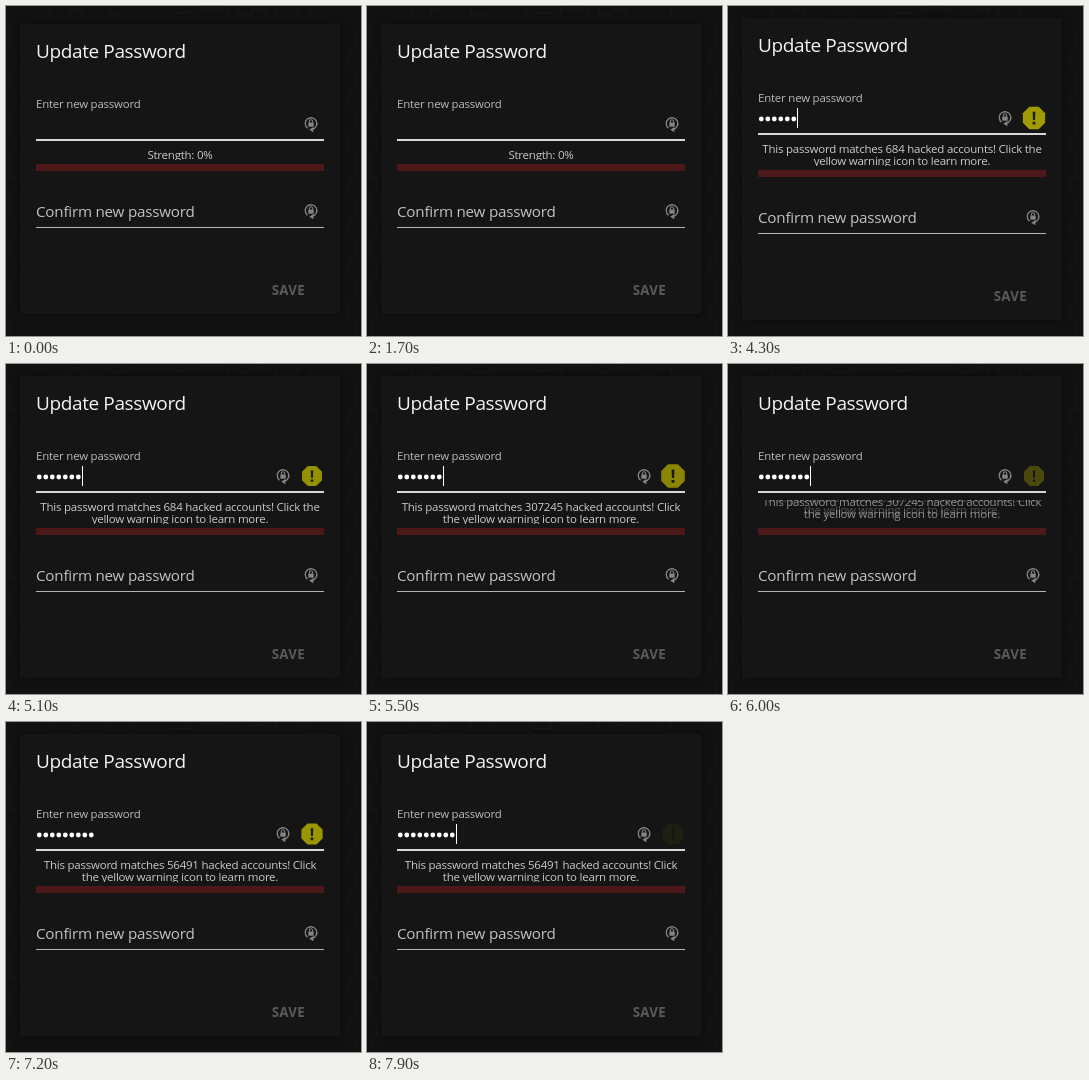
Recreate the animation shown at these times as an HTML page. Size 355 by 330 pixels, loop 8000 ms.

```html
<!DOCTYPE html>
<html lang="en">
<head>
<meta charset="utf-8">
<title>Update Password</title>
<style>
html, body { margin: 0; width: 100%; height: 100%; overflow: hidden; background: #111; }
svg { display: block; width: 355px; height: 330px; }
text { font-family: "Open Sans", "Noto Sans", sans-serif; letter-spacing: -.01em; white-space: pre; }
.title { font-size: 19px; letter-spacing: -.02em; fill: #f4f4f4; }
.label { font-size: 11.4px; font-weight: 500; letter-spacing: -.015em; fill: #bcbcbc; }
.field { font-size: 15.2px; font-weight: 500; letter-spacing: -.015em; fill: #c2c2c2; }
.msg { font-size: 11.5px; font-weight: 500; letter-spacing: -.02em; fill: #cacaca; text-anchor: middle; }
.save { font-size: 13.3px; font-weight: 700; letter-spacing: .3px; fill: #5a5a5a; }
</style>
</head>
<body>
<svg viewBox="0 0 355 330">
  <defs>
    <filter id="blur" x="-20%" y="-20%" width="140%" height="140%"><feGaussianBlur stdDeviation="5"/></filter>
    <clipPath id="clip"><rect id="clipBox" x="20" y="142" width="310" height="12"/></clipPath>
    <g id="lock" fill="none" stroke="#858585" stroke-width="1.3">
      <path d="M-3.4 4.2A5.8 5.8 0 1 1 1.4 5.2"/>
      <path d="M2.4 3V8.2L-1.8 5.8Z" fill="#858585" stroke="none"/>
      <path d="M-1.6 -1.4V-2.6A1.6 1.6 0 0 1 1.6 -2.6V-1.4" stroke-width="1.1"/>
      <rect x="-2.7" y="-1.5" width="5.4" height="4.2" fill="#858585" stroke="none"/>
    </g>
  </defs>
  <rect width="355" height="330" fill="#111"/>
  <g id="pattern" fill="none" stroke="#181818"></g>
  <rect id="shadow" x="14" width="320" fill="#080808" opacity=".35" filter="url(#blur)"/>
  <rect id="card" x="14" width="320" rx="2" fill="#151515"/>
  <g id="upper">
    <text class="title" x="30" y="52">Update Password</text>
    <text class="label" x="30" y="102">Enter new password</text>
    <g id="dots" fill="#fff"></g>
    <rect id="caret" y="108" width="1" height="20" fill="#fff"/>
    <use id="entryLock" href="#lock" y="118"/>
    <g id="warning">
      <path d="M-4.2 -10H4.2L10 -4.2V4.2L4.2 10H-4.2L-10 4.2V-4.2Z" fill="#a09b02"/>
      <path d="M-1.2 -5.5H1.2L.9 1.8H-.9ZM-1.2 3.4H1.2V5.8H-1.2Z" fill="#1b1b12"/>
    </g>
    <rect x="30" y="133" width="288" height="2" fill="#d6d6d6"/>
    <g id="messages" clip-path="url(#clip)"></g>
  </g>
  <g id="lower">
    <rect x="30" y="158" width="288" height="7" fill="#4c1818"/>
    <text class="field" x="30" y="211">Confirm new password</text>
    <use href="#lock" x="305" y="205"/>
    <rect x="30" y="221" width="288" height="1" fill="#b4b4b4"/>
    <text class="save" x="265.7" y="289">SAVE</text>
  </g>
</svg>
<script>
const LOOP = 8000, GROW = 4000, FADE = 300, SLIDE = 14, PITCH = 6.5;
const keys = [2200, 2500, 2800, 3300, 3800, 3900, 5100, 5800, 6500];
const matched = n => `This password matches ${n} hacked accounts! Click`;
const notices = [
  [0, "Strength: 0%"],
  [GROW, matched(684) + " the", "yellow warning icon to learn more."],
  [5200, matched(307245), "the yellow warning icon to learn more."],
  [5900, matched(53158), "the yellow warning icon to learn more."],
  [6600, matched(56491), "the yellow warning icon to learn more."]
];
// Phase in ms and opacity of the warning's one-second pulse
const pulse = [[0, .38], [100, .92], [300, 1], [500, .85], [700, .46], [880, 0], [1000, .38]];

const $ = id => document.getElementById(id);
const set = (el, attrs) => { for (const k in attrs) el.setAttribute(k, attrs[k]); return el; };
const add = (parent, tag, attrs) =>
  parent.appendChild(set(document.createElementNS("http://www.w3.org/2000/svg", tag), attrs));

// Faint circuit traces around the card
const trace = d => add($("pattern"), "path", { d });
trace("M44 0V11H64V4H76V11H96M104 0V9H120M166 7H184V0M194 11V2H222V11M232 0V9H246V3H260V11M270 0V10H292V0M304 0V11H322");
for (const x of [124, 162]) add($("pattern"), "circle", { cx: x, cy: 7, r: 3.5 });
for (let y = 20; y < 320; y += 42)
  trace(`M4 ${y}V${y + 26}H10V${y + 42}M349 ${y}V${y + 26}H342V${y + 42}`);

const dots = keys.map((_, i) => add($("dots"), "circle", { cx: 33.3 + i * PITCH, cy: 119, r: 2.4 }));
const messages = notices.map(([, ...lines]) => {
  const g = add($("messages"), "g", {});
  lines.forEach((line, i) =>
    add(g, "text", { class: "msg", x: 174, y: 153 + i * 12 }).textContent = line);
  return g;
});

const clamp = v => Math.min(1, Math.max(0, v));

function pulseAt(ms) {
  const i = pulse.findIndex(p => p[0] > ms);
  const [t0, v0] = pulse[i - 1], [t1, v1] = pulse[i];
  return v0 + (v1 - v0) * (ms - t0) / (t1 - t0);
}

function drawWarning(t) {
  const phase = t % 1000;
  const scale = 1 + .18 * Math.sin(Math.PI * clamp((phase - 100) / 900));
  set($("warning"), {
    opacity: t >= GROW ? pulseAt(phase) : 0,
    transform: `translate(306 118) scale(${scale})`
  });
}

function caretOn(t, count) {
  if (!count) return Math.floor((t + 300) / 500) % 2 === 1;
  return Math.floor((t - keys[count - 1]) / 500) % 2 === 0;
}

function draw(t) {
  const count = keys.filter(k => k <= t).length;
  const grown = t >= GROW, shift = grown ? 6 : 0;

  set($("upper"), { transform: `translate(0 ${-shift})` });
  set($("lower"), { transform: `translate(0 ${shift})` });
  for (const id of ["card", "shadow"]) set($(id), { y: 18 - shift, height: 290 + 2 * shift });
  set($("clipBox"), { height: grown ? 24 : 12 });

  dots.forEach((d, i) => set(d, { opacity: i < count ? 1 : 0 }));
  set($("caret"), { x: Math.round(30 + PITCH * count), opacity: caretOn(t, count) ? 1 : 0 });
  set($("entryLock"), { x: grown ? 277 : 305 });
  drawWarning(t);

  messages.forEach((m, i) => {
    const enter = i ? clamp((t - notices[i][0]) / FADE) : 1;
    const leave = notices[i + 1] ? clamp((t - notices[i + 1][0]) / FADE) : 0;
    const shown = Math.min(enter, 1 - leave);
    set(m, { opacity: shown, transform: `translate(0 ${SLIDE * (shown - 1)})` });
  });
}

const start = performance.now();
function tick() {
  draw((performance.now() - start) % LOOP);
  requestAnimationFrame(tick);
}
tick();
</script>
</body>
</html>
```
